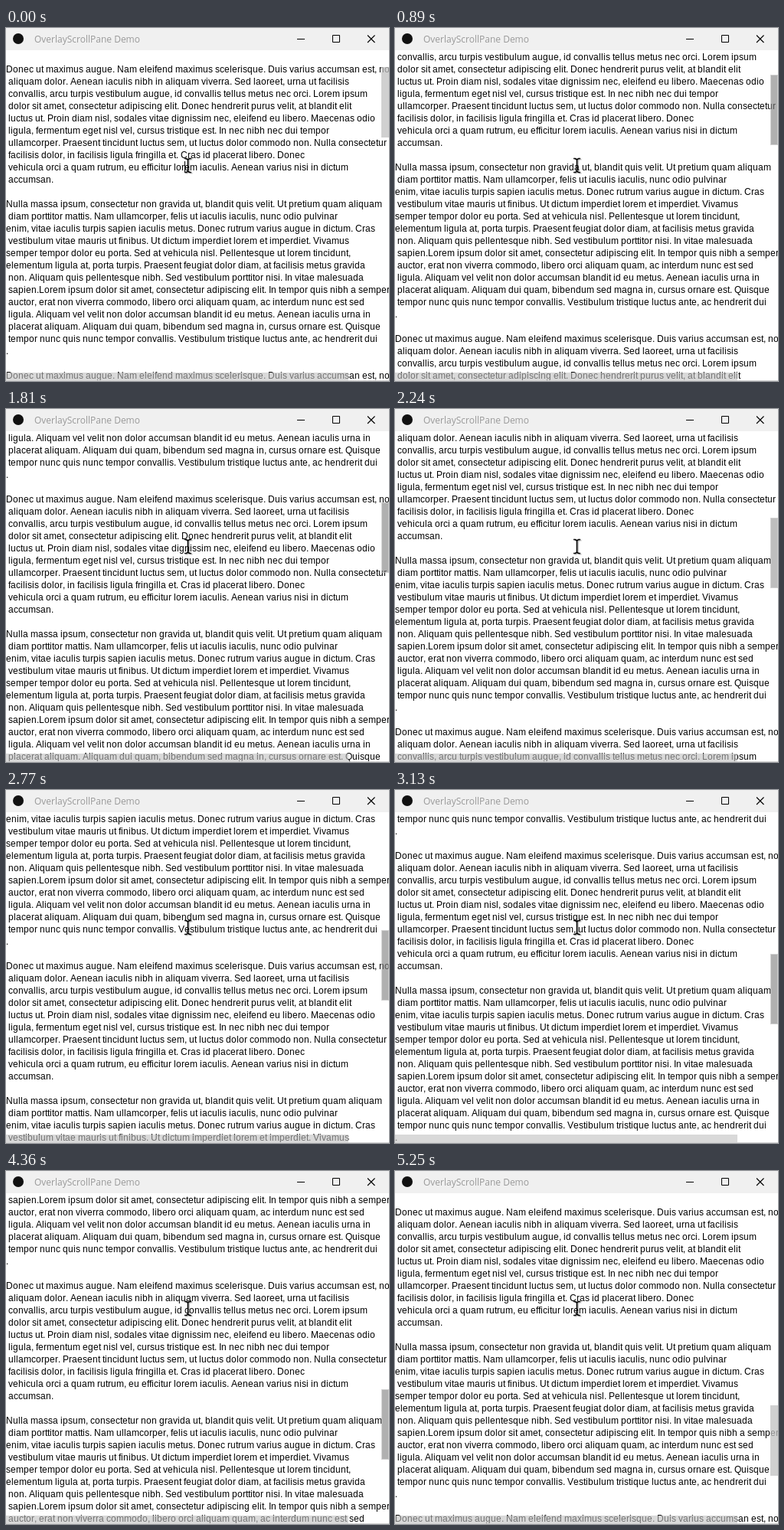
Write an HTML page with a canvas that moves like this. It is 500 px wide and 461 px high and loops after 5680 ms.

```html
<!DOCTYPE html>
<html lang="en">
<head>
<meta charset="utf-8">
<title>OverlayScrollPane Demo</title>
<style>
  html, body { margin: 0; width: 100%; height: 100%; overflow: hidden; background: #fff; }
  canvas { display: block; }
</style>
</head>
<body>
<canvas id="stage" width="500" height="461"></canvas>
<script>
const LOOP = 5680, LINE = 16, TOP = 30, BOTTOM = 460, WHEEL = 3 * LINE;
const LINES = `Donec ut maximus augue. Nam eleifend maximus scelerisque. Duis varius accumsan est, non
 aliquam dolor. Aenean iaculis nibh in aliquam viverra. Sed laoreet, urna ut facilisis
 convallis, arcu turpis vestibulum augue, id convallis tellus metus nec orci. Lorem ipsum
 dolor sit amet, consectetur adipiscing elit. Donec hendrerit purus velit, at blandit elit
 luctus ut. Proin diam nisl, sodales vitae dignissim nec, eleifend eu libero. Maecenas odio
 ligula, fermentum eget nisl vel, cursus tristique est. In nec nibh nec dui tempor
 ullamcorper. Praesent tincidunt luctus sem, ut luctus dolor commodo non. Nulla consectetur
 facilisis dolor, in facilisis ligula fringilla et. Cras id placerat libero. Donec
 vehicula orci a quam rutrum, eu efficitur lorem iaculis. Aenean varius nisi in dictum
 accumsan.

Nulla massa ipsum, consectetur non gravida ut, blandit quis velit. Ut pretium quam aliquam
 diam porttitor mattis. Nam ullamcorper, felis ut iaculis iaculis, nunc odio pulvinar
enim, vitae iaculis turpis sapien iaculis metus. Donec rutrum varius augue in dictum. Cras
 vestibulum vitae mauris ut finibus. Ut dictum imperdiet lorem et imperdiet. Vivamus
semper tempor dolor eu porta. Sed at vehicula nisl. Pellentesque ut lorem tincidunt,
elementum ligula at, porta turpis. Praesent feugiat dolor diam, at facilisis metus gravida
 non. Aliquam quis pellentesque nibh. Sed vestibulum porttitor nisi. In vitae malesuada
 sapien.Lorem ipsum dolor sit amet, consectetur adipiscing elit. In tempor quis nibh a semper
 auctor, erat non viverra commodo, libero orci aliquam quam, ac interdum nunc est sed
 ligula. Aliquam vel velit non dolor accumsan blandit id eu metus. Aenean iaculis urna in
 placerat aliquam. Aliquam dui quam, bibendum sed magna in, cursus ornare est. Quisque
 tempor nunc quis nunc tempor convallis. Vestibulum tristique luctus ante, ac hendrerit dui
.
`.split("\n");
const PERIOD = LINES.length * LINE;

// Times of the wheel notches, and of the thumb's tone changes.
const NOTCHES = [690, 1050, 1250, 1450, 1580, 1700, 1810, 1910, 1980, 2340, 2470, 2600, 2770,
  2900, 3030, 3130, 3260, 3390, 3780, 4100, 4190, 4280, 4360, 4530, 4730];
const LIGHT = "rgba(192,192,192,.75)", MID = "rgba(156,156,156,.65)", DARK = "rgba(128,128,128,.62)";
const TONES = [[0, LIGHT], [760, MID], [830, DARK], [2240, MID], [2410, DARK], [3650, MID],
  [3780, LIGHT], [3840, MID], [3900, DARK], [4990, MID], [5250, LIGHT]];

const ctx = document.getElementById("stage").getContext("2d");

function rect(c, color, x, y, w, h) {
  c.fillStyle = color;
  c.fillRect(x, y, w, h);
}

function stroke(color, width, d) {
  ctx.strokeStyle = color;
  ctx.lineWidth = width;
  ctx.stroke(new Path2D(d));
}

// Glyphs advance by whole pixels, as in a classic desktop text area.
function makePage() {
  const page = document.createElement("canvas");
  page.width = 500;
  page.height = PERIOD;
  const c = page.getContext("2d");
  c.font = '12px "Liberation Sans", Arial, sans-serif';
  c.fillStyle = "#000";
  LINES.forEach((line, row) => {
    let x = 0;
    for (const ch of line) {
      c.fillText(ch, x, row * LINE + 12);
      x += Math.round(c.measureText(ch).width);
    }
  });
  return page;
}

function drawTitleBar() {
  rect(ctx, "#f0f0f0", 0, 0, 500, 29);
  ctx.fillStyle = "#111";
  ctx.beginPath();
  ctx.arc(16, 14, 7, 0, 7);
  ctx.fill();
  ctx.font = '12px "Open Sans", sans-serif';
  ctx.fillStyle = "#999";
  ctx.fillText("OverlayScrollPane Demo", 37, 19);
  stroke("#000", 1, "M380 14.5h10M426.5 9.5h9v9h-9z");
  stroke("#000", 1.1, "M472 9.5l9.5 9.5M481.5 9.5l-9.5 9.5");
}

function drawPointer() {
  const beam = "M233 170.5h2.5l2 1.5 2-1.5h2.5M237.5 172v15M233 188.5h2.5l2-1.5 2 1.5h2.5";
  ctx.save();
  ctx.translate(1.5, 1);
  stroke("rgba(0,0,0,.22)", 2, beam);
  ctx.restore();
  stroke("#000", 1.6, beam);
}

const page = makePage();

function draw(t) {
  const notches = NOTCHES.filter(at => at <= t).length;
  const scroll = notches * WHEEL;
  const tone = TONES.filter(([at]) => at <= t).pop()[1];

  rect(ctx, "#fff", 0, 0, 500, 461);
  ctx.save();
  ctx.beginPath();
  ctx.rect(0, TOP, 500, BOTTOM - TOP);
  ctx.clip();
  for (let y = TOP + LINE - scroll % PERIOD - PERIOD; y < BOTTOM; y += PERIOD) ctx.drawImage(page, 0, y);
  if (t < 360 || (t >= 910 && t < 1350)) rect(ctx, "#000", 233, 174 - scroll, 1, 14);

  const thumb = Math.floor(51 + notches * 10.2);
  ctx.fillStyle = LIGHT;
  ctx.fill(new Path2D(`M490 ${thumb}h10v92h-10zM491 ${thumb + 1}v90h8v-90z`), "evenodd");
  rect(ctx, tone, 491, thumb + 1, 8, 90);
  rect(ctx, "rgba(192,192,192,.6)", 0, 450, 447, 10);
  ctx.restore();

  rect(ctx, "#d4d4d4", 0, 460, 500, 1);
  drawTitleBar();
  drawPointer();
}

const start = performance.now();
function tick() {
  draw((performance.now() - start) % LOOP);
  requestAnimationFrame(tick);
}
tick();
</script>
</body>
</html>
```
